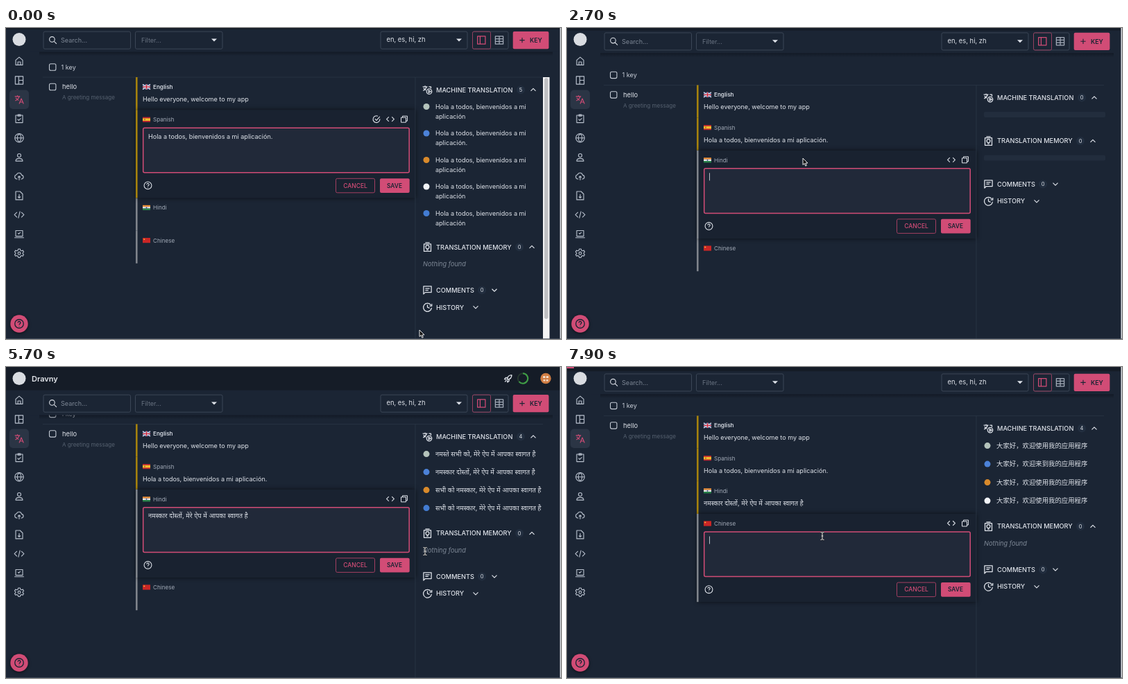
Animation of 800x449 px, one loop 8000 ms. Source, as an HTML page:

```html
<!DOCTYPE html>
<html lang="en">
<head>
<meta charset="utf-8">
<title>Translation editor</title>
<style>
html, body { margin: 0; width: 100%; height: 100%; overflow: hidden; background: #1b2534; }
svg { display: block; }
text { font-family: Inter, "Noto Sans", "Noto Sans Devanagari", "Noto Sans CJK SC", "Noto Sans CJK", sans-serif; white-space: pre; }
</style>
</head>
<body>
<svg id="stage" width="800" height="449" viewBox="0 0 800 449"></svg>
<script>
const BG = '#1b2534', PINK = '#d14c76', INK = '#dfe3ea', DIM = '#a3abb8', LINE = '#3b4656';
const LOOP = 8000, ROW = 47.2, OPEN_ROW = 127.2;

// Icons live on a 24 x 24 grid.
const ICONS = {
  home: 'M4 10 12 3l8 7v11H4zM9 21v-7h6v7',
  layout: 'M3 3h18v18H3zM11 3v18M11 12h10',
  columns: 'M3 3h18v18H3zM9 3v18',
  table: 'M3 3h18v18H3zM3 9h18M3 15h18M12 3v18',
  translate: 'M2 5h12M8 2.5V5M12 5c-1 4-5 8-9 10M4 8c2 3 4 5 7 6M12 22l5-12 5 12M13.5 18h7',
  machine: 'M1 5h11M6.5 2.5V5M10 5c-1 4-4 7-8 9M3 8c2 3 3 4 5 5M15 5h5v4M14.5 13l5 3-5 3zM22 16a6 6 0 1 1-12 0a6 6 0 1 1 12 0',
  tasks: 'M4 4h16v17H4zM9 2.5h6V6H9zM8 13l3 3 5-5',
  globe: 'M22 12a10 10 0 1 1-20 0a10 10 0 1 1 20 0M2 12h20M12 2c-6 6-6 14 0 20c6-6 6-14 0-20',
  user: 'M16 8a4 4 0 1 1-8 0a4 4 0 1 1 8 0M4 21c0-8 16-8 16 0z',
  upload: 'M8 18H6.5a5 5 0 0 1-.5-9.9a6 6 0 0 1 11.6 1A4.5 4.5 0 0 1 18 18h-2M12 21v-9M9 14.5l3-3 3 3',
  file: 'M4 2.5h10l6 6v13H4zM12 9v8M9 14.5l3 3 3-3',
  script: 'M7 6l-6 6 6 6M17 6l6 6-6 6M14 4l-4 16',
  code: 'M8 6l-6 6 6 6M16 6l6 6-6 6',
  laptop: 'M4 4h16v13H4zM1 20.5h22M9 10l2 2 4-4',
  gear: 'M15 12a3 3 0 1 1-6 0a3 3 0 1 1 6 0M10 2h4l.7 3 2.8 1.5 3-1 2 3.5-2.3 2v2l2.3 2-2 3.5-3-1-2.8 1.5-.7 3h-4l-.7-3-2.8-1.5-3 1-2-3.5 2.3-2v-2l-2.3-2 2-3.5 3 1L9.3 5z',
  help: 'M22 12a10 10 0 1 1-20 0a10 10 0 1 1 20 0M9 9.5a3 3 0 1 1 4.5 2.6q-1.5.9-1.5 2.4M12 17v1',
  done: 'M21 11v1a9 9 0 1 1-5.3-8.2M8 11l4 4 9-10',
  copy: 'M3 7h14v14H3zM7 7V3h14v14h-4',
  pencil: 'M3 21l1-5L17 3l4 4L8 20z',
  comment: 'M3 3h18v14H7l-4 4zM7 8h10M7 12h7',
  memory: 'M4 5h16v17H4zM7 2h10M16 12a4 4 0 1 1-8 0a4 4 0 1 1 8 0M10 18.5h4',
  history: 'M20 7A9.5 9.5 0 1 0 21.5 13M12 6v6l5 2M22 4v5h-5',
  keyboard: 'M1 5h22v14H1zM5 9h2M9 9h2M13 9h2M17 9h2M5 12.5h2M9 12.5h2M13 12.5h2M17 12.5h2M8 16h8',
  search: 'M17 10a7 7 0 1 1-14 0a7 7 0 1 1 14 0M15 15l7 7',
  close: 'M5 5l14 14M19 5 5 19',
  plus: 'M12 4v16M4 12h16',
  up: 'M6 15l6-6 6 6',
  down: 'M6 9l6 6 6-6',
  rocket: 'M9 14c1-6 5-11 12-11c0 7-5 11-11 12zM9 10H5l-3 4 5 .5M14 15v4l-4 3-.5-5M3 21l4-4'
};

const rect = (x, y, w, h, fill, more = '') =>
  `<rect x="${x}" y="${y}" width="${w}" height="${h}" fill="${fill}" ${more}/>`;
const box = (x, y, w, h, stroke, fill = 'none', sw = 1) =>
  rect(x, y, w, h, fill, `rx="2" stroke="${stroke}" stroke-width="${sw}"`);
const circle = (x, y, r, fill, more = '') =>
  `<circle cx="${x}" cy="${y}" r="${r}" fill="${fill}" ${more}/>`;
const text = (x, y, s, size = 9.2, fill = INK, more = '') =>
  `<text x="${x}" y="${y + size * 0.36}" font-size="${size}" fill="${fill}" ${more}>${s}</text>`;
const shape = (d, fill, x = 0, y = 0, more = '') =>
  `<path d="${d}" fill="${fill}" transform="translate(${x} ${y})" ${more}/>`;
const icon = (name, x, y, size = 14, color = INK, sw = 2) =>
  `<path d="${ICONS[name]}" fill="none" stroke="${color}" stroke-width="${sw}" stroke-linejoin="round"
    transform="translate(${x - size / 2} ${y - size / 2}) scale(${size / 24})"/>`;
const group = (y, s) => `<g transform="translate(0 ${y})">${s}</g>`;

// Devanagari and Chinese run slightly larger than Latin text.
const body = (x, y, s, fill) =>
  text(x, y, s, /[\u4e00-\u9fff]/.test(s) ? 9.4 : /[\u0900-\u097f]/.test(s) ? 9.32 : 9.06, fill);

const ease = (t, a, b) => {
  const u = Math.min(1, Math.max(0, (t - a) / (b - a)));
  return u * u * (3 - 2 * u);
};

// Pointer: time, x, y
const PATH = [
  [0, 596, 436], [300, 596, 436], [1000, 560, 228], [1400, 560, 228], [1880, 345, 220],
  [2000, 340, 191], [2600, 340, 188], [3100, 340, 188], [3800, 671, 168], [4100, 671, 168],
  [4600, 660, 151], [5000, 660, 151], [5600, 604, 266], [5750, 604, 266], [6300, 560, 286],
  [6700, 560, 286], [7250, 368, 243], [8000, 368, 244]
];
function pointer(t) {
  const i = Math.max(1, PATH.findIndex(p => p[0] >= t));
  const [a, x, y] = PATH[i - 1], [b, x2, y2] = PATH[i], u = ease(t, a, b);
  return [x + (x2 - x) * u, y + (y2 - y) * u];
}

const ES = 'Hola a todos, bienvenidos a mi';
const HI = 'मेरे ऐप में आपका स्वागत है';
const HINDI = 'नमस्कार दोस्तों, ' + HI;
const ZH = '大家好，欢迎使用我的应用程序';
const HINTS = {
  1: [ES, ES, ES, ES, ES],
  2: ['नमस्ते सभी को, ' + HI, HINDI, 'सभी को नमस्कार, ' + HI, 'सभी को नमस्कार, ' + HI],
  3: [ZH, '大家好，欢迎来到我的应用程序', ZH, ZH]
};
const MARKS = ['#b4c3bb', '#4c82d8', '#d98a2b', '#f2f4f7', '#437cd2'];

function stateAt(t) {
  const open = t < 1300 ? 1 : t < 2500 ? -1 : t < 6600 ? 2 : t < 7500 ? -1 : 3;
  return {
    t, open,
    saved: t < 2500 ? 1 : 2,
    picked: t >= 4900,
    loaded: t < 1300 || (t >= 3200 && t < 6600) || t >= 7800,
    caretFrom: t < 1300 ? -600 : t < 4900 ? 2550 : t < 6600 ? 4900 : 7550,
    head: 35 * (ease(t, 2660, 2960) - ease(t, 7700, 7960)),
    scroll: 11.4 * ease(t, 2590, 2700) - 12 * ease(t, 7650, 7850)
  };
}

function flag(i, y) {
  const f = (x, y, w, h, c) => rect(x, y, w, h, c);
  const art = [
    () => f(0, 0, 11, 8, '#29437f') +
      shape('M0 0l11 8M11 0L0 8', 'none', 0, 0, 'stroke="#d9dce4" stroke-width="1.5"') +
      f(0, 2.7, 11, 2.6, '#eee') + f(4.2, 0, 2.6, 8, '#eee') + f(0, 3.3, 11, 1.4, '#c8233c') + f(4.8, 0, 1.4, 8, '#c8233c'),
    () => f(0, 0, 11, 8, '#bd2430') + f(0, 2, 11, 4, '#f1bd2c') + f(2, 3, 2, 2, '#b56a35'),
    () => f(0, 0, 11, 2.7, '#ee9038') + f(0, 2.7, 11, 2.6, '#eee') + f(0, 5.3, 11, 2.7, '#27834a') + circle(5.5, 4, 1, '#34458c'),
    () => f(0, 0, 11, 8, '#ca2626') + circle(2.3, 2.3, 1, '#f0c43b')
  ][i]();
  return `<g transform="translate(197 ${y - 3.6}) scale(1 .9)">${art}</g>`;
}

function editor(y, s) {
  const value = s.open === 1 ? ES + ' aplicación.' : s.open === 2 && s.picked ? HINDI : '';
  const caret = (s.t - s.caretFrom) % 1000 < 500 && !value;
  const tools = s.open === 1 ? icon('done', 534, y + 13.5, 13) : '';
  return rect(188, y, 402, OPEN_ROW, '#192230', 'style="filter:drop-shadow(0 0 3px #0009)"') +
    tools + icon('code', 554, y + 13.5, 13) + icon('copy', 574, y + 13.5, 12) +
    box(197.7, y + 26, 383.5, 64.6, PINK, '#212939', 1.5) +
    body(205, y + 38.2, value) + (caret ? rect(205, y + 32.5, 0.8, 11, INK) : '') +
    icon('help', 204.5, y + 109.2, 13) +
    box(475.5, y + 99.1, 56, 20.5, '#a33f62') + text(503.5, y + 109.3, 'CANCEL', 8.5, PINK, 'font-weight="500" text-anchor="middle"') +
    rect(539, y + 99, 42.7, 20.7, PINK, 'rx="2"') + text(560, y + 109.3, 'SAVE', 8.4, BG, 'font-weight="600" text-anchor="middle"');
}

function rowAt(s, x, y) {
  if (x < 188 || x > 590) return -1;
  let top = 71 + s.scroll;
  for (let i = 0; i < 4; i++) {
    const h = i === s.open ? OPEN_ROW : ROW;
    if (y >= top && y < top + h) return i;
    top += h;
  }
  return -1;
}

function list(s, hover) {
  const o = s.scroll;
  const done = s.t < 6600 ? 2 : 3;
  const values = ['Hello everyone, welcome to my app', ES + ' aplicación.', done > 2 ? HINDI : '', ''];
  const check = y => box(62.5, y - 4.7, 9.4, 9.4, '#c3cad4', 'none', 1.1);
  let out = check(56.5 + o) + text(79.5, 56.5 + o, '1 key', 9.1, '#c6ccd6') +
    rect(53, 70.7 + o, 721, 0.7, '#2b3747') +
    check(85 + o) + text(81, 85 + o, 'hello', 9.3) +
    text(81, 100.5 + o, 'A greeting message', 8.05, '#566170');
  let y = 71 + o, late = '';
  ['English', 'Spanish', 'Hindi', 'Chinese'].forEach((name, i) => {
    const edit = i === s.open, h = edit ? OPEN_ROW : ROW;
    const kept = s.open < 0 && i === s.saved;
    let row = '';
    if (edit) row += editor(y, s);
    else {
      if (i === hover || kept) {
        row += rect(188, y, 402, h, kept ? '#202a39' : '#1e2837');
        if (i < done && i) row += icon('done', 534, y + 14, 13);
        row += icon('pencil', 554, y + 14, 12.5) + icon('comment', 574, y + 14, 12.5);
      }
      row += body(197, y + 31.7, values[i]);
    }
    row += flag(i, y + 14) + text(212, y + 14, name, 8.1, i ? DIM : '#d3d8e0', i ? '' : 'font-weight="600"') +
      rect(187, y, 2.6, h, i < done ? '#a5820d' : '#7f848b');
    if (edit) late = row; else out += row;
    y += h;
  });
  return out + late;
}

function panel(s, hoverItem) {
  const o = s.scroll;
  let out = rect(589.6, 71 + o, 0.8, 449, '#2b3747');
  if (s.open < 0) return out + text(600, 90 + o, 'Hint', 10.9) + icon('close', 770, 89 + o, 13) +
    icon('keyboard', 607.5, 123 + o, 15) + text(620, 123 + o, 'KEYBOARD SHORTCUTS') + icon('down', 747, 123 + o, 14);

  const title = (y, ic, name, count, cx, arrow, ax) =>
    icon(ic, 607.5, y, 15) + text(620, y, name, 9.2, INK, 'font-weight="500"') +
    (count === '' ? '' : circle(cx, y, 6, '#222e3f') + text(cx, y, count, 7.5, INK, 'text-anchor="middle"')) +
    icon(arrow, ax, y, 14);
  const items = s.loaded ? HINTS[s.open] : [];
  const m = 89.2 + o;
  const memory = m + (!s.loaded ? 62.5 : { 1: 227, 2: 139.5, 3: 141.5 }[s.open]);
  out += title(m, 'machine', 'MACHINE TRANSLATION', items.length, 742, 'up', 760);
  items.forEach((item, i) => {
    const y = m + (s.open === 1 ? 24.3 + 38.5 * i : 25 + (s.open === 2 ? 26 : 26.5) * i);
    const mark = MARKS[s.open === 2 && i === 3 ? 4 : i];
    const hot = i === hoverItem;
    if (hot) out += rect(598, y - 13, 176, 26, '#202a39');
    out += circle(606, y, 4.5, mark) + body(619, y, item, hot ? PINK : INK);
    if (s.open === 1) out += body(619, y + 14, i === 1 ? 'aplicación.' : 'aplicación');
  });
  out += title(memory, 'memory', 'TRANSLATION MEMORY', 0, 740, 'up', 758);
  if (s.loaded) out += text(601, memory + 24.4, 'Nothing found', 9.2, '#7d8795', 'font-style="italic"');
  else for (const y of [m, memory]) out += rect(601, y + 20.5, 175, 8, '#222d3d', 'rx="2"');
  out += title(memory + 62.3, 'comment', 'COMMENTS', 0, 686, 'down', 704) +
    title(memory + 87, 'history', 'HISTORY', '', 0, 'down', 677);
  if (s.open === 1) out += rect(774, 71, 9.5, 378, '#f4f4f5') + rect(776, 72, 5.5, 348, '#bfc0c3', 'rx="2.7"');
  return out;
}

function toolbar() {
  const caret = x => shape('M-4 -2h8l-4 4z', INK, x, 17.5);
  return rect(34, 0, 764, 34.5, BG) + rect(48, 34.5, 740, 6, 'url(#fade)') +
    box(54, 5.2, 125.5, 25, LINE) + icon('search', 67.5, 17.5, 13) + text(79, 17.7, 'Search...', 9.1, '#7c8694') +
    box(186.5, 5.2, 125.5, 25, LINE) + text(195, 17.7, 'Filter...', 9.1, '#687281') + caret(300) +
    box(540, 5.2, 125, 25, LINE) + text(548.5, 17, 'en, es, hi, zh', 9.4) + caret(653) +
    box(672.5, 5.2, 51.5, 25, LINE) + box(672.5, 5.2, 26, 25, '#94405f') +
    icon('columns', 685.3, 17.5, 15, PINK) + icon('table', 711, 17.5, 15, DIM) +
    rect(730.7, 5, 51.7, 25.3, PINK, 'rx="2"') + icon('plus', 744, 17.6, 11, BG, 2.4) +
    text(755, 17.9, 'KEY', 8.9, BG, 'font-weight="600"');
}

function sidebar() {
  const names = ['home', 'layout', 'translate', 'tasks', 'globe', 'user', 'upload', 'file', 'script', 'laptop', 'gear'];
  return rect(5, 89.5, 28, 27.5, '#2b3545', 'rx="5"') +
    names.map((n, i) => icon(n, 19, 47.7 + 27.75 * i, 15, i === 2 ? PINK : '#b9c1cd', 1.8)).join('') +
    circle(19, 427, 12.7, PINK, 'style="filter:drop-shadow(0 1px 2px #0009)"') + icon('help', 19, 427, 15, BG, 2.2);
}

function header(h) {
  return group(0.9 * (h - 35), rect(0, 0, 800, 33.5, '#151c27') +
    text(37, 16.7, 'Dravny', 11, '#e3e6eb', 'font-weight="600"') +
    icon('rocket', 724, 16.5, 13, INK, 2.6) +
    circle(745, 16.5, 7.2, 'none', 'stroke="#26382f" stroke-width="2"') +
    shape('M0 -7.2a7.2 7.2 0 1 1 -5.5 11.8', 'none', 745, 16.5, 'stroke="#3f9d46" stroke-width="2"') +
    circle(778, 16.5, 7.7, '#cf7d43') + rect(774, 13, 8, 3, '#f2dcc9', 'rx="1"') +
    rect(774.5, 18, 7, 2.5, '#f2dcc9') + rect(777.3, 10, 1.4, 13, '#cf7d43'));
}

const CURSORS = {
  arrow: ['M0 0v9.5l2.2-2 1.6 3.7 1.6-.7L3.8 7H7z', '#111', '#fff'],
  hand: ['M-1 .8q1-1.5 1.8 0l.5 4 1.2-.6 1.2.5 1.3.3.3 3.5-1.5 3h-4.5l-3-4.3q0-1.4 1.4-.7l1.3 1z', '#fff', '#222'],
  beam: ['M-2.5 -5.5q2 0 2.5 1q.5-1 2.5-1M0 -4.5v9M-2.5 5.5q2 0 2.5-1q.5 1 2.5 1M-1.3 0h2.6', 'none', '#fff']
};
function cursor(s, x, y, row, item) {
  const button = s.open > 0 && x > 539 && x < 582 && Math.abs(y - (71 + s.scroll + ROW * s.open + 109)) < 11;
  const field = row >= 0 && row === s.open && y > 71 + s.scroll + ROW * row + 25;
  const note = s.open === 2 && s.loaded && x > 600 && x < 664 && Math.abs(y - 264) < 7;
  const kind = button || item >= 0 || (row >= 0 && row !== s.open) ? 'hand' : (field && x < 582) || note ? 'beam' : 'arrow';
  const [d, fill, stroke] = CURSORS[kind];
  const under = kind === 'beam' ? shape(d, 'none', x, y, 'stroke="#222" stroke-width="2.2"') : '';
  return under + shape(d, fill, x, y, `stroke="${stroke}" stroke-width=".9"`);
}

function draw(t) {
  const s = stateAt(t), [x, y] = pointer(t);
  const before = pointer(Math.max(0, t - 150));
  const pick = Math.floor((y - 112.6) / 26);
  const item = s.open === 2 && s.loaded && x > 598 && x < 774 && pick >= 0 && pick < 4 ? pick : -1;
  return '<defs><linearGradient id="fade" x2="0" y2="1"><stop stop-color="#0a0f18" stop-opacity=".5"/>' +
    '<stop offset="1" stop-color="#0a0f18" stop-opacity="0"/></linearGradient></defs>' +
    rect(0, 0, 800, 449, BG) + list(s, rowAt(s, ...before)) + panel(s, item) +
    group(s.head, toolbar()) + sidebar() + header(s.head) +
    circle(19, 16.5, 9.5, '#d9dce1') +
    (t > 7850 ? rect(0, 0, (t - 7850) / 5, 2, PINK) : '') +
    rect(798.5, 0, 1.5, 449, '#d5d8dc') + rect(0, 448.3, 800, 0.7, '#4b5563') +
    cursor(s, x, y, rowAt(s, x, y), item);
}

const stage = document.getElementById('stage');
const start = performance.now();
let last = -1;
function tick() {
  const t = Math.floor(((performance.now() - start) % LOOP) / 100) * 100;
  if (t !== last) stage.innerHTML = draw(last = t);
  requestAnimationFrame(tick);
}
tick();
</script>
</body>
</html>
```
